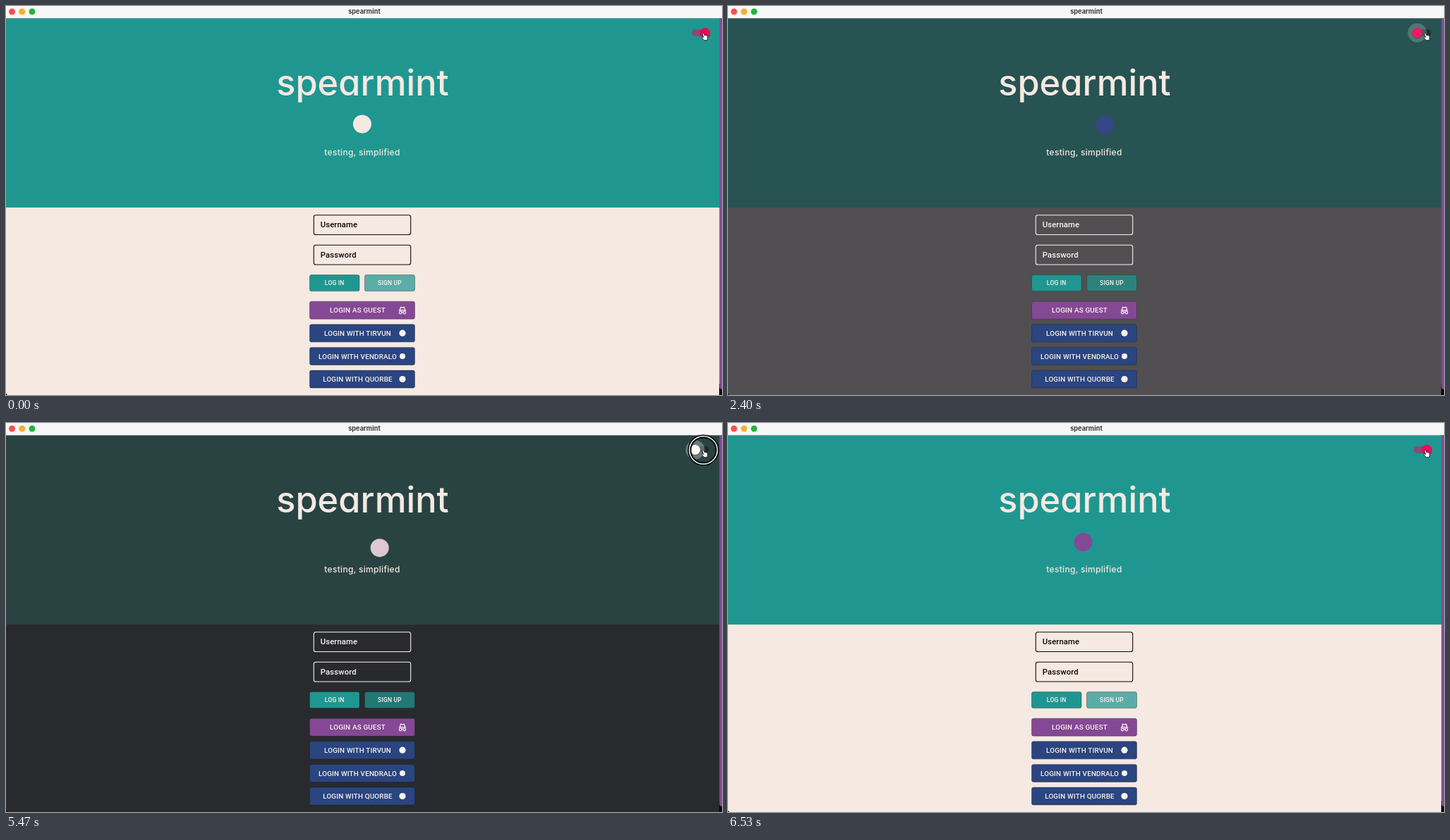
These frames come from a looping animation (1015 by 552 pixels, 6590 ms). An HTML page:

```html
<!DOCTYPE html>
<html lang="en">
<head>
<meta charset="utf-8">
<title>spearmint</title>
<style>
html, body { margin: 0; width: 100%; height: 100%; overflow: hidden; background: #000; }
svg { display: block; width: 1015px; height: 552px; }
text { text-anchor: middle; }
.brand { font-family: Inter, sans-serif; font-weight: 500; font-feature-settings: "cv11"; fill: #f5e9e2; }
.ui { font-family: Roboto, sans-serif; font-weight: 500; fill: #fbf3ee; }
.label { font-size: 11.3px; letter-spacing: .1px; text-anchor: start; }
.small { font-size: 8.5px; letter-spacing: .2px; }
.big { font-size: 9.87px; letter-spacing: .18px; }
.line { fill: none; stroke: #fbf3ee; stroke-width: 1.2; }
</style>
</head>
<body>
<svg viewBox="0 0 1015 552">
  <rect id="form" y="286" width="1015" height="266"/>
  <rect id="head" y="17.5" width="1015" height="268.5"/>
  <rect width="1015" height="17.5" fill="#f8f7f8"/>
  <circle cx="8.5" cy="8" r="4.5" fill="#fe5048"/>
  <circle cx="22.7" cy="8" r="4.5" fill="#f6b02c"/>
  <circle cx="37" cy="8" r="4.5" fill="#23b53b"/>
  <text x="508" y="10.8" font-family="Inter, sans-serif" font-weight="700" font-size="9.2" fill="#3d3a3d">spearmint</text>

  <text class="brand" x="505.5" y="126.5" font-size="50.5">spearmint</text>
  <circle id="mark" r="13"/>
  <text class="brand" x="505" y="211.5" font-size="12" letter-spacing=".3">testing, simplified</text>

  <g id="fields"></g>
  <g id="buttons"></g>
  <g class="line">
    <path d="M558.6 431 L559.4 427.4 Q562 428.4 564.6 427.4 L565.4 431 M556.8 431.6 H567.2 M560.8 434.6 Q562 433.8 563.2 434.6"/>
    <circle cx="559.2" cy="435" r="1.8"/>
    <circle cx="564.8" cy="435" r="1.8"/>
  </g>
  <g fill="#fbf3ee">
    <circle cx="562" cy="464.2" r="4.6"/>
    <circle cx="562" cy="496.9" r="4"/>
    <circle cx="562" cy="529.5" r="4.6"/>
  </g>

  <rect id="track" x="972" y="33" width="24.5" height="10" rx="5"/>
  <circle id="halo" cy="38" r="13.5" fill="#fff"/>
  <circle id="shade" cy="38.8" r="7.4" fill="#000" opacity=".2"/>
  <circle id="thumb" cy="38" r="7.1"/>
  <g id="ring" fill="none">
    <circle cx="988.6" cy="38.5" r="19.6" stroke="#000" stroke-width="5"/>
    <circle cx="988.6" cy="38.5" r="19.8" stroke="#fff" stroke-width="1.5"/>
  </g>
  <path d="M987.4 38.6 q1.1 -.8 1.8 .5 l1 2.5 q.8 -.7 1.4 .1 q1 -.5 1.5 .4 q1.3 -.3 1.5 1.1 q.6 2.1 -.2 3.7 l-.4 1.9 h-4.4 l-2.7 -3.4 q-.8 -1.2 .2 -1.6 q.8 -.1 1.6 .8 l-1.5 -4.6 q-.2 -1 .2 -1.4 Z" fill="#fff" stroke="#111" stroke-width=".9" stroke-linejoin="round"/>

  <path d="M1011 536 V552 H1015 V536 Z M0 549.5 Q.5 551.5 2.5 552 H0 Z" fill="#0b080c"/>
  <path d="M1011.3 17.5 H1015 V544 Q1011.3 544 1011.3 540 Z" fill="#85489a"/>
</svg>
<script>
const LOOP = 6590, TO_DARK = 2150, TO_LIGHT = 5875, FADE = 500;
const $ = id => document.getElementById(id);
const clamp = x => Math.min(1, Math.max(0, x));
const lerp = (a, b, k) => a + (b - a) * k;
const mix = (a, b, k) => `rgb(${a.map((v, i) => Math.round(lerp(v, b[i], k)))})`;
const set = (el, attrs) => { for (const k in attrs) el.setAttribute(k, attrs[k]); };

function add(parent, tag, attrs, text = "") {
  const el = document.createElementNS("http://www.w3.org/2000/svg", tag);
  set(el, attrs);
  el.textContent = text;
  return parent.appendChild(el);
}

// cubic-bezier(.25, .1, .25, 1), solved by bisection
function ease(x) {
  const curve = (u, p, q) => 3 * u * (1 - u) ** 2 * p + 3 * u * u * (1 - u) * q + u ** 3;
  let lo = 0, hi = 1;
  for (let i = 0; i < 20; i++) {
    const mid = (lo + hi) / 2;
    if (curve(mid, .25, .25) < x) lo = mid; else hi = mid;
  }
  return curve(lo, .1, 1);
}

const CREAM = [245, 233, 226], PURPLE = [131, 73, 149], BLUE = [43, 70, 132];
const MARK = [[0, CREAM], [1325, PURPLE], [1600, PURPLE], [2500, BLUE],
  [4000, PURPLE], [5300, CREAM], [6100, PURPLE], [LOOP, PURPLE]];

[["Username", 296.7], ["Password", 339.2]].forEach(([name, y]) => {
  add($("fields"), "rect", { x: 436.3, y, width: 137.4, height: 27.8, rx: 2.8, "fill-opacity": 0, "stroke-width": 1.1 });
  add($("fields"), "text", { class: "ui label", x: 445.8, y: y + 17.6, style: "fill: inherit" }, name);
});

const BLUE_FILL = "#2a457f";
const plates = [
  ["LOG IN", 430.5, 381.6, 70.5, 23, "#1f9790", 1],
  ["SIGN UP", 508.5, 381.6, 71, 23, "#1f9790", .72],
  ["LOGIN AS GUEST", 430.5, 419.2, 149, 25, "#854895", 1],
  ["LOGIN WITH TIRVUN", 430.5, 451.8, 149, 25, BLUE_FILL, 1],
  ["LOGIN WITH VENDRALO", 430.5, 484.4, 149, 25, BLUE_FILL, 1],
  ["LOGIN WITH QUORBE", 430.5, 517, 149, 25, BLUE_FILL, 1]
].map(([name, x, y, width, height, fill, opacity]) => {
  const small = width < 100;
  const plate = add($("buttons"), "rect", { x, y, width, height, rx: 2.6, fill, "fill-opacity": opacity, stroke: "#000" });
  add($("buttons"), "text", {
    class: "ui " + (small ? "small" : "big"),
    x: small ? x + width / 2 : 498.5,
    y: y + height / 2 + (small ? 2.9 : 3.6)
  }, name);
  return plate;
});

// 0 = light, 1 = dark
function shift(t, delay, length, curve = ease) {
  const part = start => curve(clamp((t - start - delay) / length));
  return part(TO_DARK) - part(TO_LIGHT);
}

function drawMark(t) {
  const a = 2 * Math.PI * t / 3250;
  const swing = (Math.sin(a) + Math.asin(Math.sin(a)) * 2 / Math.PI) / 2;
  const i = Math.max(1, MARK.findIndex(k => k[0] > t));
  const [t0, c0] = MARK[i - 1], [t1, c1] = MARK[i];
  set($("mark"), {
    cx: 505 - 30 * swing,
    cy: 167.5 + 13 * Math.sin(2 * a),
    fill: mix(c0, c1, (t - t0) / (t1 - t0))
  });
}

function drawSwitch(t) {
  const move = shift(t, 0, 150), x = lerp(991, 977, move);
  const tint = shift(t, 200, 550);
  const press = [1750, 5360].map(s => Math.min(clamp((t - s) / 100), clamp((s + 1000 - t) / 500)));
  set($("track"), {
    fill: mix([245, 0, 87], [0, 0, 0], move),
    opacity: lerp(.5, .38, move)
  });
  set($("thumb"), { cx: x, fill: mix([245, 0, 87], [255, 250, 248], tint) });
  set($("shade"), { cx: x });
  set($("halo"), { cx: x, opacity: .3 * Math.max(...press) });
  const down = [1720, 5330].some(s => t >= s && t < s + 350);
  set($("ring"), { visibility: down ? "visible" : "hidden" });
}

function draw(t) {
  const dark = shift(t, 0, FADE);
  const ink = t >= TO_DARK && t < TO_LIGHT ? "#fbf3ee" : "#0a0808";
  set($("head"), { fill: mix([31, 151, 144], [41, 67, 67], dark) });
  set($("form"), { fill: mix(CREAM, [41, 42, 46], dark) });
  set($("fields"), { fill: ink, stroke: "none" });
  $("fields").querySelectorAll("rect").forEach(r => set(r, { stroke: ink }));
  plates.forEach(p => set(p, { "stroke-opacity": lerp(.32, .2, dark) }));
  drawMark(t);
  drawSwitch(t);
}

function tick() {
  draw(performance.now() % LOOP);
  requestAnimationFrame(tick);
}
tick();
</script>
</body>
</html>
```
